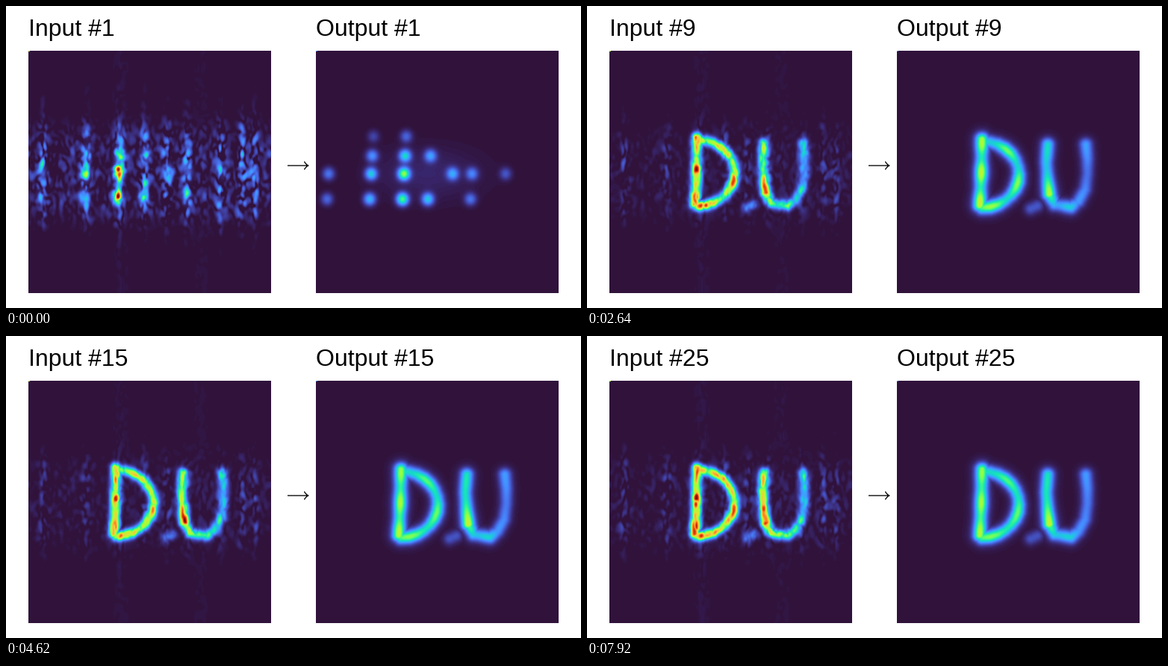
These frames come from a looping animation (770x405 px, 8000 ms). A matplotlib script:

```python
import numpy as np
import matplotlib
import matplotlib.pyplot as plt
from matplotlib.animation import FuncAnimation
from matplotlib.path import Path
from matplotlib.patches import PathPatch

W, H, N = 770, 405, 325
STEPS, HOLD, TICK, TICKS = 25, 330, 40, 200
Y, X = np.mgrid[0:N, 0:N].astype(np.float32) + 0.5
turbo = matplotlib.colormaps["turbo"]


def gauss(d, s):
    return np.exp(-(d / s) ** 2 / 2)


def blob(x, y, sx, sy):
    return gauss(X - x, sx) * gauss(Y - y, sy)


def ease(k, start, end):
    t = np.clip((k - start) / (end - start), 0, 1)
    return t * t * (3 - 2 * t)


def to_input(x, y):
    return 1.02 * x + 1, y - 2


def trace(pts):
    """Distance to a polyline and position (0 to 1) along it, for every pixel."""
    pts = np.asarray(pts, float)
    lens = np.hypot(*np.diff(pts, axis=0).T)
    best, pos, done = np.full((N, N), 1e9), np.zeros((N, N)), 0
    for (x0, y0), (x1, y1), n in zip(pts[:-1], pts[1:], lens):
        dx, dy = (x1 - x0) / n, (y1 - y0) / n
        t = np.clip((X - x0) * dx + (Y - y0) * dy, 0, n)
        d = np.hypot(X - x0 - t * dx, Y - y0 - t * dy)
        pos = np.where(d < best, (done + t) / lens.sum(), pos)
        best = np.minimum(best, d)
        done += n
    return best, pos


class Stroke:
    def __init__(self, pts, first, last, rise, beads=2.0, phase=0.0, fade=None):
        self.first, self.last, self.rise = first, last, rise
        self.beads, self.phase, self.fade = beads, phase, fade
        d, self.s_out = trace(pts)
        self.g_out = 0.9 * gauss(d, 5.3) + 0.1 * gauss(d, 10.5)
        d, self.s_in = trace([to_input(x, y) for x, y in pts])
        self.g_in = gauss(d, 4.2)

    def light(self, g, s, k):
        level = self.first + (self.last - self.first) * s
        contrast = 0.12 + 0.45 * np.exp(-k / 5)
        level = level * (1 + contrast * np.cos(2 * np.pi * (self.beads * s - self.phase)))
        gain = ease(k, *self.rise)
        if self.fade:
            gain *= 1 - ease(k, *self.fade)
        return g * level * gain


angle = np.linspace(-np.pi / 2, np.pi / 2, 15)
bowl = np.c_[114 + 49.5 * np.cos(angle), 166 + 44.5 * np.sin(angle)]
strokes = [
    Stroke([(114, 119), (113, 165), (111, 207)], 0.43, 0.47, (0, 2), 2.2, 0.1),
    Stroke(bowl, 0.35, 0.41, (0, 8), 3, 0.75),
    Stroke([(202, 126), (200, 150), (202, 175), (204, 192)], 0.29, 0.5, (1, 10), 1, 0),
    Stroke([(204, 192), (211, 206), (233, 210), (243, 202)], 0.36, 0.22, (0, 10), 1.5, 0.1),
    Stroke([(253, 126), (255, 145), (255, 165), (252, 186), (243, 202)],
           0.18, 0.17, (0, 9), 1, 0),
    Stroke([(70, 133), (65, 165), (69, 187)], 0.08, 0.08, (0, 2), 1, 0.6, (3, 5)),
    Stroke([(179, 212), (188, 208)], 0.08, 0.08, (0, 3), 0),
]

# spots of the first step: rows of points, dimmer away from the brightest column
COLS = [17, 74, 118, 152, 183, 209, 254, 283, 300]
ROWS = [(115, 0.25, (1, 2)), (141, 0.65, (1, 2, 3)),
        (165, 1.0, (0, 1, 2, 4, 5, 6)), (199, 0.86, (0, 1, 2, 3, 5))]
spots_in, spots_out = 0, 0.028 * blob(150, 165, 48, 24)
for y, weight, picks in ROWS:
    for c in picks:
        x = COLS[c] + 0.06 * (165 - y)
        a = weight * np.exp(-abs(COLS[c] - 118) / 85)
        spots_out = spots_out + 0.46 * a * blob(x, y, 5.3, 5.6)
        xi, yi = to_input(x, y)
        spots_in = spots_in + a ** 1.8 * blob(xi, yi, 4, 6.5)

columns = np.minimum(sum(gauss(X - c - 3, 4) for c in COLS), 1)
ghosts = gauss(X - 124, 9) + gauss(X - 231, 8)


def speckle(seed):
    """Smooth complex noise, slightly stretched upright."""
    rng = np.random.default_rng(seed)
    f = np.fft.fftfreq(N)
    filt = np.exp(-2 * np.pi ** 2 * ((2.4 * f[None]) ** 2 + (4 * f[:, None]) ** 2))
    raw = rng.normal(size=(N, N)) + 1j * rng.normal(size=(N, N))
    field = np.fft.ifft2(np.fft.fft2(raw) * filt)
    return field / np.sqrt(np.mean(np.abs(field) ** 2))


base_field = speckle(7)


def paint(v, corner):
    v[0, :2] = corner
    return turbo(np.clip(v, 0, 1), bytes=True)


def input_panel(k):
    early = max(0, 1 - k / 3)
    mag = np.abs(0.85 * base_field + 0.53 * speckle(100 + k))
    band = np.exp(-((Y - 164) / 60) ** 4) * (0.3 + 0.7 * columns)
    tall = 0.2 * gauss(Y - 160, 55) * columns
    noise = (0.05 + 0.13 * early) * np.clip(mag - 0.5, 0, 2) * (band + tall)
    noise += 0.008 * ghosts * np.clip(mag - 0.3, 0, 1)
    shape = np.max([1.6 * s.light(s.g_in, s.s_in, k) for s in strokes], axis=0)
    shape = np.maximum(shape, early * spots_in) * np.clip(0.76 + 0.27 * mag, 0.76, 1.15)
    v = shape + noise
    return paint(v / v.max(), 0.5)


def output_panel(k):
    early = max(0, 1 - k / 3)
    shape = np.max([s.light(s.g_out, s.s_out, k) for s in strokes], axis=0)
    return paint(np.maximum(shape, early * spots_out), 0.15)


inputs = [input_panel(k) for k in range(STEPS)]
outputs = [output_panel(k) for k in range(STEPS)]

fig = plt.figure(figsize=(W / 100, H / 100), dpi=100, facecolor="white")


def panel(left, img):
    ax = fig.add_axes([left / W, 1 - 385 / H, N / W, N / H])
    ax.axis("off")
    return ax.imshow(img, interpolation="nearest", aspect="auto")


im_in, im_out = panel(30, inputs[0]), panel(415, outputs[0])

stage = fig.add_axes([0, 0, 1, 1])
stage.set(xlim=(0, W), ylim=(H, 0))
stage.axis("off")
font = dict(family="Liberation Sans", size=32 * 0.72, color="black", va="baseline")
label_in = stage.text(30, 40, "", **font)
label_out = stage.text(415, 40, "", **font)

arrow = Path([(377, 214), (405, 214),
              (399.5, 208.5), (401, 212.5), (405, 214), (401, 215.5), (399.5, 219.5)],
             [Path.MOVETO, Path.LINETO, Path.MOVETO] + [Path.CURVE3] * 4)
stage.add_patch(PathPatch(arrow, fill=False, ec="black", lw=0.95, snap=False))


def draw(i):
    k = min((i * TICK + TICK - 10) // HOLD, STEPS - 1)
    im_in.set_data(inputs[k])
    im_out.set_data(outputs[k])
    label_in.set_text(f"Input #{k + 1}")
    label_out.set_text(f"Output #{k + 1}")
    return im_in, im_out, label_in, label_out


anim = FuncAnimation(fig, draw, frames=TICKS, init_func=lambda: draw(0),
                     interval=TICK, repeat=True, repeat_delay=0)
plt.show()
```
